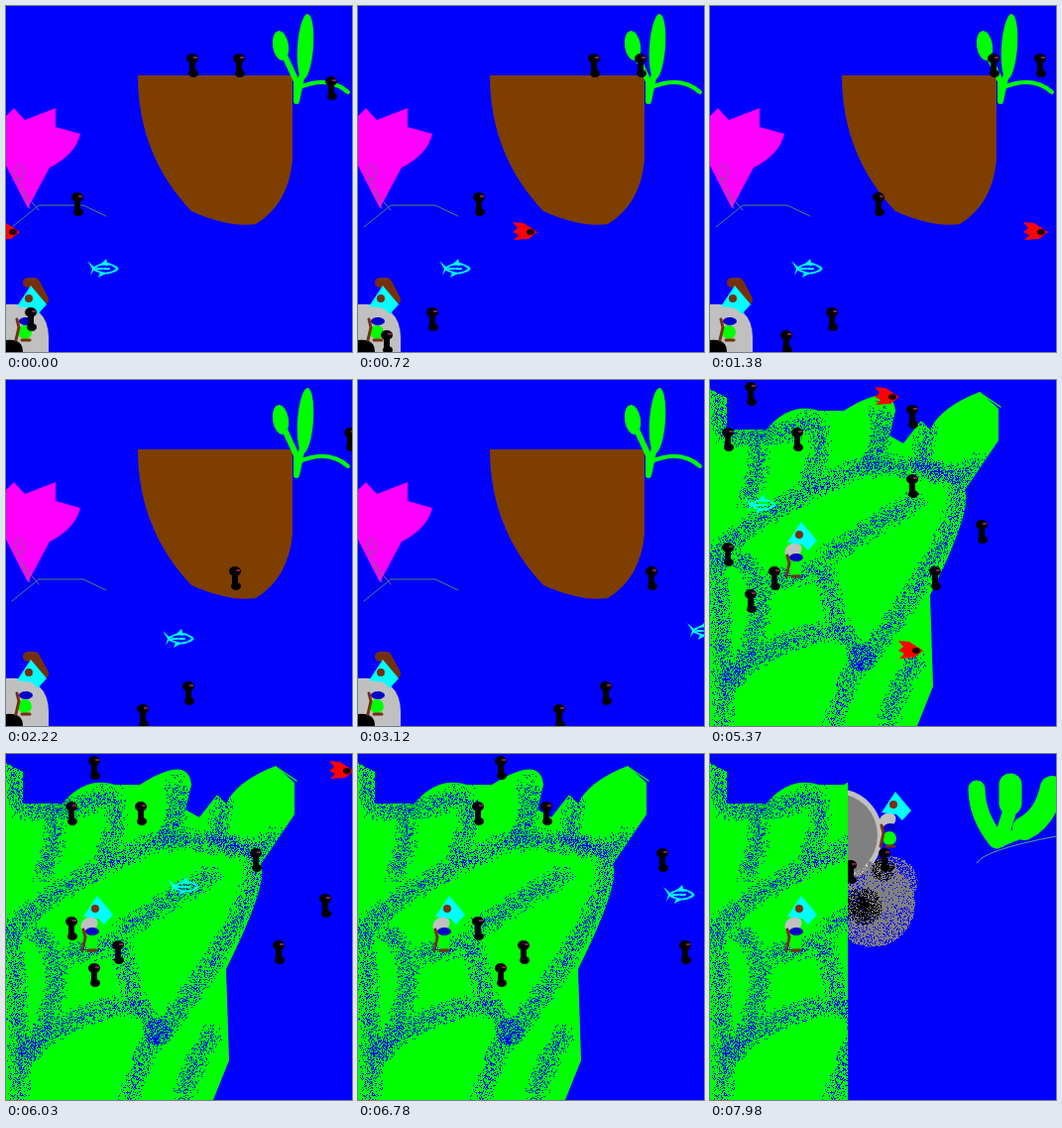
Recreate the animation shown at these times as an HTML page with a canvas. Size 349 by 349 pixels, loop 8 s.

```html
<!DOCTYPE html>
<html lang="en">
<head>
<meta charset="utf-8">
<title>Underwater rooms</title>
<style>
  html, body { margin: 0; width: 100%; height: 100%; overflow: hidden; background: #00f; }
  canvas { display: block; width: 349px; height: 349px; }
</style>
</head>
<body>
<canvas id="stage" width="349" height="349"></canvas>
<script>
const SIZE = 349, LOOP = 8000, STEP = 30;
const CELL = SIZE / 15, UNIT = SIZE / 480;

// Speeds per step, depth offsets and moments of the story.
const WALK = 3 * UNIT, SWIM = 8 * UNIT, DART = 10 * UNIT;
const KELP_WIPE = 4075, KELP_OPEN = 4830, CAVE_WIPE = 7529, WIPE_TIME = 750;

const BLUE = '#00f', GREEN = '#0f0', CYAN = '#0ff', RED = '#f00', BLACK = '#000',
      BROWN = '#7d3e00', RUST = '#74300c', SILVER = '#c0c0c0', GRAY = '#808080';

const clamp = (v, lo, hi) => Math.min(hi, Math.max(lo, v));

let seed = 4711;
const random = () => (seed = (seed * 16807) % 2147483647) / 2147483647;

function fill(g, color, d) {
  g.fillStyle = color;
  g.fill(new Path2D(d));
}

function line(g, color, width, d) {
  g.strokeStyle = color;
  g.lineWidth = width;
  g.lineJoin = g.lineCap = 'round';
  g.stroke(new Path2D(d));
}

function oval(g, color, x, y, rx, ry, tilt = 0) {
  g.fillStyle = color;
  g.beginPath();
  g.ellipse(x, y, rx, ry, tilt, 0, Math.PI * 2);
  g.fill();
}

function at(g, x, y, draw) {
  g.save();
  g.translate(Math.round(x), Math.round(y));
  draw(g);
  g.restore();
}

// Spray can: random single pixels, denser in the middle for a higher falloff.
function spray(g, color, x, y, radius, count, falloff = 0.5) {
  g.fillStyle = color;
  for (let i = 0; i < count; i++) {
    const angle = random() * Math.PI * 2, r = radius * random() ** falloff;
    g.fillRect(Math.round(x + Math.cos(angle) * r), Math.round(y + Math.sin(angle) * r), 1, 1);
  }
}

function sprayAlong(g, color, d) {
  const path = document.createElementNS('http://www.w3.org/2000/svg', 'path');
  path.setAttribute('d', d);
  for (let s = 0, end = path.getTotalLength(); s < end; s += 2) {
    const p = path.getPointAtLength(s);
    spray(g, color, p.x, p.y, 12, 13, 0.7);
  }
}

function room(paint) {
  const canvas = document.createElement('canvas');
  canvas.width = canvas.height = SIZE;
  const g = canvas.getContext('2d');
  g.fillStyle = BLUE;
  g.fillRect(0, 0, SIZE, SIZE);
  paint(g);
  return canvas;
}

function walker(g) {
  oval(g, BLACK, 0, -7, 6, 5);
  line(g, BLACK, 6, 'M0-5V8');
  oval(g, BLACK, 1, 8, 5, 4);
  g.fillStyle = '#80204c';
  g.fillRect(1, -9, 4, 2);
}

function redFish(g) {
  fill(g, RED, 'M-12-9L-1-8 13 1 4 8-11 9-6 4-12 1-7-3Z');
  oval(g, '#200000', 6, 1, 4, 3);
}

function cyanFish(g) {
  fill(g, CYAN, 'M-16-8L-8-1-13 7-11 0ZM-3-4L3-10 5-3ZM-3 4L-5 9 4 4Z');
  g.setLineDash([5, 2]);
  line(g, CYAN, 2, 'M-10 0Q3-10 15 0Q3 9-10 0M-6 0H8');
  g.setLineDash([]);
}

function diver(g) {
  oval(g, SILVER, -7, 14, 9, 7, -0.5);
  fill(g, CYAN, 'M1-15L17 4 8 14 2 8-13 6Z');
  oval(g, RUST, -1, -2, 4, 4);
  oval(g, '#0000c8', -4, 21, 7, 4);
  oval(g, GREEN, -5, 32, 7, 7);
  line(g, RUST, 3, 'M-13 19L-11 27-14 40M-8 40H0');
}

const reef = room(g => {
  fill(g, BROWN, 'M133 70H289V155Q285 200 252 220Q225 224 187 207Q133 150 133 70Z');
  oval(g, GREEN, 277, 40, 8, 15, -0.15);
  oval(g, GREEN, 302, 41, 8, 33, 0.07);
  line(g, GREEN, 6, 'M281 50L293 76V96L299 68');
  line(g, GREEN, 4, 'M294 83Q325 69 345 87');
  fill(g, '#f0f', 'M0 111L8 103 19 115 50 103V122L75 129Q70 150 44 163L22 204 0 161Z');
  line(g, '#458568', 1, 'M6 223L33 201H78L101 212');
  line(g, '#806080', 1, 'M33 206L17 187 10 172C4 160 18 157 18 167S14 176 10 172M17 187L24 204');
  fill(g, SILVER, 'M0 301Q43 298 43 335V349H0Z');
  fill(g, BLACK, 'M0 337Q17 335 17 349H0Z');
  line(g, RUST, 10, 'M22 279H29L38 296');
  at(g, 24, 297, diver);
});

const kelp = room(g => {
  fill(g, GREEN, 'M0 9L17 18V50H57Q80 22 110 31H135Q184 0 187 31L181 56 195 64 213 41 222 50Q233 27 272 12L291 29V61L257 111Q265 130 222 217L225 309 209 349H0Z');
  line(g, GREEN, 1.5, 'M272 13L293 27');

  for (let i = 0; i < 3; i++) {
    sprayAlong(g, BLUE, `M${47 + 62 * i} ${62 - 16 * i}q6 30-12 60`);
  }
  for (let i = 0; i < 2; i++) {
    sprayAlong(g, BLUE, `M${153 + 55 * i} 280q-20 30-30 69`);
  }
  const stems = [
    'M7 10L13 55Q80 60 106 36',
    'M0 178Q60 125 163 83L250 96 271 82',
    'M2 175Q14 223 13 349',
    'M25 176Q80 215 17 307Q60 255 135 252L153 283',
    'M62 203L115 190 129 250',
    'M117 177L210 119',
    'M218 48L211 85 250 100Q256 155 155 282'
  ];
  stems.forEach(d => sprayAlong(g, BLUE, d));
  spray(g, BLUE, 153, 280, 14, 300);
  at(g, 91, 158, diver);
});

const cave = room(g => {
  oval(g, SILVER, 128, 82, 46, 47);
  oval(g, GRAY, 128, 82, 41, 42);
  spray(g, GRAY, 163, 151, 43, 8500, 0.6);
  spray(g, GRAY, 182, 130, 27, 1800);
  spray(g, BLACK, 154, 153, 19, 1100, 0.9);
  spray(g, BLACK, 174, 116, 12, 330);
  line(g, GREEN, 17, 'M269 35Q269 62 289 87');
  line(g, GREEN, 23, 'M303 31L303 50');
  line(g, GREEN, 14, 'M303 55L293 87');
  line(g, GREEN, 24, 'M345 34Q338 65 317 75');
  line(g, GREEN, 12, 'M322 76L292 88');
  line(g, '#60a080', 1, 'M269 110Q275 97 349 83');
  at(g, 186, 53, diver);
  at(g, 142, 119, walker);
  at(g, 176, 107, walker);
});

// Walkers start on grid cells: [column, row].
const reefCells = [[8, 2], [10, 2], [14, 3], [3, 8], [1, 13], [-1, 14]];
const kelpCells = [[0, 0], [-1, 2], [2, 2], [7, 4], [10, 6], [-1, 7], [1, 8], [8, 8], [0, 9]];

function drawWalkers(g, cells, steps) {
  for (const [col, row] of cells) {
    at(g, 2 + CELL * col + WALK * steps, 13.5 + CELL * row, walker);
  }
}

function drawReef(g, t) {
  const n = clamp(Math.floor(t / STEP) - 1, 0, 133);
  const swim = Math.max(0, n - 60);
  g.drawImage(reef, 0, 0);
  at(g, 98 + SWIM * swim, 265 - 0.28 * swim, cyanFish);
  at(g, 1 + DART * n, 227, redFish);
  drawWalkers(g, reefCells, n);
}

function drawKelp(g, t) {
  const n = clamp(Math.floor((t - KELP_OPEN) / STEP), 0, 90);
  g.drawImage(kelp, 0, 0);
  at(g, -54 + SWIM * n, 120 + 0.34 * n, cyanFish);
  at(g, 47 + DART * n, 16, redFish);
  at(g, 71 + DART * n, 272, redFish);
  drawWalkers(g, kelpCells, n);
  // This one is gone once the red fish reaches it.
  if (n < 21) drawWalkers(g, [[7, 1]], n);
}

// The next room is uncovered from the right edge.
function wipe(g, progress, drawNext) {
  const edge = Math.round(SIZE * (1 - clamp(progress, 0, 1)));
  g.save();
  g.beginPath();
  g.rect(edge, 0, SIZE - edge, SIZE);
  g.clip();
  drawNext();
  g.restore();
}

const stage = document.getElementById('stage').getContext('2d');
const start = performance.now();

function render(now) {
  const elapsed = Math.max(0, now - start) % LOOP;
  const t = Math.floor(elapsed / STEP) * STEP;
  if (t < KELP_OPEN) drawReef(stage, t);
  else drawKelp(stage, t);
  if (t >= 4170 && t < KELP_OPEN) {
    wipe(stage, (t - KELP_WIPE) / WIPE_TIME, () => drawKelp(stage, t));
  }
  if (t > CAVE_WIPE) {
    wipe(stage, (t - CAVE_WIPE) / WIPE_TIME, () => stage.drawImage(cave, 0, 0));
  }
  requestAnimationFrame(render);
}
render(start);
</script>
</body>
</html>
```
